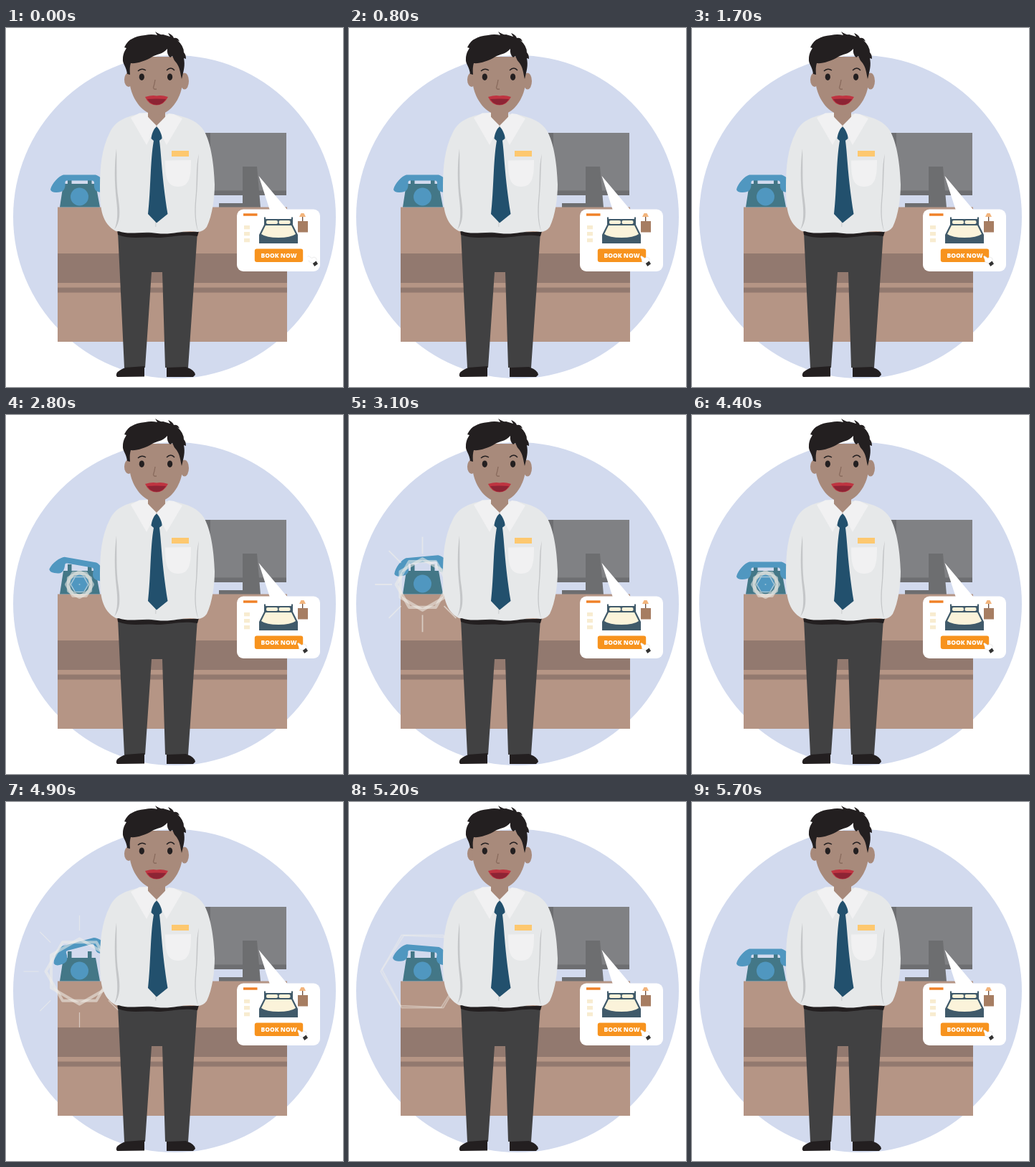
Write an HTML page with a canvas that moves like this. It is 470 px wide and 500 px high and loops after 6 s.

```html
<!DOCTYPE html>
<html lang="en">
<head>
<meta charset="utf-8">
<title>Reception desk</title>
<style>
  html, body { margin: 0; width: 100%; height: 100%; overflow: hidden; background: #fff; }
  canvas { display: block; width: 470px; height: 500px; }
</style>
</head>
<body>
<canvas id="stage" width="470" height="500"></canvas>
<script>
const ctx = document.getElementById('stage').getContext('2d');
const LOOP = 6000, STEP = 100;
const SKIN = '#a88a7b', HAIR = '#231f20', NAVY = '#22506d', BLUE = '#5097c0';
const TEAL = '#437787', WOOD = '#b59585', DARK_WOOD = '#92796f', BED = '#405a6a';
const CREAM = '#fbf3da', ORANGE = '#f7931e';

const clamp = v => Math.max(0, Math.min(1, v));
const span = (t, a, b) => clamp((t - a) / (b - a));

// Linear interpolation through [time, value] pairs.
function track(keys, t) {
  if (t <= keys[0][0]) return keys[0][1];
  for (let i = 1; i < keys.length; i++) {
    const [a, v] = keys[i - 1], [b, w] = keys[i];
    if (t <= b) return v + (w - v) * (t - a) / (b - a);
  }
  return keys[keys.length - 1][1];
}

function fill(color, d) {
  ctx.fillStyle = color;
  ctx.fill(new Path2D(d));
}
function line(color, width, d) {
  ctx.strokeStyle = color;
  ctx.lineWidth = width;
  ctx.stroke(new Path2D(d));
}
function rect(color, x, y, w, h) {
  ctx.fillStyle = color;
  ctx.fillRect(x, y, w, h);
}
function round(color, x, y, w, h, r) {
  ctx.fillStyle = color;
  ctx.beginPath();
  ctx.roundRect(x, y, w, h, r);
  ctx.fill();
}
function oval(color, x, y, rx, ry = rx) {
  ctx.fillStyle = color;
  ctx.beginPath();
  ctx.ellipse(x, y, rx, ry, 0, 0, Math.PI * 2);
  ctx.fill();
}

function drawRoom() {
  oval('#d2daee', 235, 263, 225);
  rect('#808184', 277, 146, 114, 87);
  rect('#6d6e71', 277, 146, 8, 87);
  rect('#6d6e71', 277, 226.5, 114, 6.5);
  fill('#6d6e70', 'M330 193H350L355 250H297V244H330Z');
  rect(WOOD, 72, 249.5, 320, 187.5);
  rect(DARK_WOOD, 72, 314, 320, 41);
  rect(DARK_WOOD, 72, 361.5, 320, 7);
}

// Handset swing: angle in degrees and lift in pixels.
const SWING = [[0, 0], [300, 10], [500, -15], [750, 10], [1000, -15], [1200, 10], [1300, 0]];
const LIFT = [[0, 0], [300, -3], [500, -10], [750, -3], [1000, -10], [1200, -3], [1300, 0]];

function drawPhone(t) {
  const s = t < 4100 ? t - 2500 : t - 4400;
  fill(TEAL, 'M80 217H125L131 249.5H75Z');
  rect(TEAL, 86, 208, 5.5, 10);
  rect(TEAL, 114, 208, 5.5, 10);
  oval(BLUE, 102.5, 235, 12.5);

  ctx.save();
  ctx.translate(102.5, 212 + track(LIFT, s));
  ctx.rotate(track(SWING, s) * Math.PI / 180);
  ctx.translate(-102.5, -212);
  fill(BLUE, 'M62 225C64 216 74 206 80 204.5H125C131 206 141 216 143 225Q142 229 135 229' +
    'C125 229 122 225 123 216Q123 212.5 120 212.5H85Q82 212.5 82.5 216C83 225 80 229 70 229Q63 229 62 225Z');
  ctx.restore();
}

function hexagon(r, turn) {
  ctx.beginPath();
  for (let i = 0; i < 6; i++) {
    const a = turn + i * Math.PI / 3;
    ctx.lineTo(102.5 + r * Math.cos(a), 236 + r * Math.sin(a));
  }
  ctx.closePath();
  ctx.stroke();
}

const RADIUS = [[0, 0], [300, 18], [700, 43], [800, 47], [1000, 58], [1400, 59]];
const WIDTH = [[0, 5], [300, 5], [800, 4], [1000, 2.4], [1400, 0.5]];
const TURN = [[300, Math.PI / 6], [800, Math.PI / 6], [1000, 0.06], [1400, 0]];

function drawWave(s) {
  if (s <= 0 || s >= 1400) return;
  const r = track(RADIUS, s);
  ctx.save();
  ctx.lineJoin = 'round';
  ctx.strokeStyle = '#f1eee9';
  ctx.lineWidth = track(WIDTH, s);
  ctx.globalAlpha = 0.55 * (1 - span(s, 1000, 1400));
  hexagon(r, 0);
  hexagon(r * 0.97, track(TURN, s));
  if (s < 600) {
    ctx.lineWidth = 1.5;
    hexagon(r * 0.68, 0);
    oval('#dfe9ee', 102.5, 236, 1);
  }

  if (s > 400 && s < 900) {
    const p = span(s, 400, 800);
    const inner = 28 + 29 * p, outer = 38 + 40 * Math.sqrt(p);
    ctx.globalAlpha = 0.6;
    ctx.lineWidth = 2.4 - 1.2 * p;
    ctx.beginPath();
    for (let i = 0; i < 8; i++) {
      const c = Math.cos(i * Math.PI / 4), n = Math.sin(i * Math.PI / 4);
      ctx.moveTo(102.5 + inner * c, 236 + inner * n);
      ctx.lineTo(102.5 + outer * c, 236 + outer * n);
    }
    ctx.stroke();
  }
  ctx.restore();
}

function drawBody() {
  fill('#414142', 'M156 284H267L254 473H222L218 340H203L194 473H165Z');
  fill(HAIR, 'M166 473L193 471V485.5L155 486Q151 481 160 476Z');
  fill(HAIR, 'M224 473L251 472Q264 477 264 483L261 486H224Z');
  fill(HAIR, 'M155 282C170 286 230 288 269 283L267 290C245 286 230 292 210 292C190 290 175 295 156 288Z');
  fill('#e6e8e9', 'M188 119C170 123 153 128 145 145C133 168 131 195 131 220C131 247 132 269 150 281' +
    'Q154 284 157 283C174 289 190 282 211 286C233 289 248 280 267 284Q275 284 280 277' +
    'C288 261 291 235 291 218C290 190 286 160 276 143C268 130 254 125 234 120Z');
  fill('#c4c6c8', 'M154 168C151 190 151 215 154 240C156 257 156 270 151 281C160 270 159 256 157 240C153 215 155 195 154 168Z');
  fill('#c4c6c8', 'M269 175C267 195 268 211 266 232C264 252 264 267 268 283C265 277 262 262 264 240C267 215 264 195 269 175Z');
  fill('#f1f1f2', 'M222 184.5L258 184C258 207 256 221 240 221C224 221 222 207 222 184.5Z');
  rect('#fdc86f', 231, 171, 24, 8);
  line('#c4c6c8', 0.8, 'M208.8 268V277');
}

function drawHead() {
  oval(SKIN, 171, 72, 6, 10);
  oval(SKIN, 249, 74, 6, 11.5);
  fill(SKIN, 'M198 108H222V124L210 138L198 124Z');
  fill('#f1f1f2', 'M186 118.5L198 118V124L210 136L196 163L174 125Z');
  fill('#f1f1f2', 'M222 124L227 119L234 120L246 126L224 163L210 136Z');
  fill(NAVY, 'M206 157H214C217 180 217 205 225.5 259L210 271.5L198 259C202 225 201 185 206 157Z');
  fill(NAVY, 'M210 137.5C213 139 218 149 217.5 154Q213 158 210 159Q206 158 202.5 154C203 148 206 140 210 137.5Z');

  fill(SKIN, 'M171 40H247L246 78C244 98 229 121 210 121C191 121 176 99 173 80Z');
  fill(HAIR, 'M169 64C168 54 162 49 163 43C163 36 166 31 168 28L165 27Q170 17 176 15Q182 11 194 10' +
    'Q203 8 211 10L208 5Q215 10 219 9Q226 11 229 12L226 7Q233 10 234 14Q240 13 242 19L239 17' +
    'Q248 25 248 34Q251 37 251 43L248 42C250 52 248 59 245 71C243 63 243 56 238 49' +
    'Q234 45 232 39L229 41Q224 37 225 29C218 37 211 36 204 40C195 46 181 50 174 49Q172 55 173 65Z');
  oval(HAIR, 189.3, 68.2, 3.6, 4.8);
  oval(HAIR, 228.6, 68.2, 3.6, 4.8);
  line(HAIR, 1.5, 'M184 60Q189 55 195 59');
  line(HAIR, 1.5, 'M224 59Q230 53 235 59');
  line('#8a6c5e', 1.4, 'M208 72Q207 79 205.5 83Q206 86 210 85');
  fill('#bf3441', 'M194 96Q204 93 210 94.5Q217 93 226 96Q220 107.5 210 107.5Q199 107.5 194 96Z');
  fill('#8d2434', 'M197 99Q210 98 223 99Q218 107 210 107Q202 107 197 99Z');
}

function drawBubble(press) {
  round('#fff', 322, 252.5, 116, 86.5, 9);
  fill('#fff', 'M352.5 206L393 254H368Z');
  rect('#f08026', 331, 258.3, 19.5, 3.4);
  for (let i = 0; i < 3; i++) rect('#f8ecd0', 332, 275 + 9 * i, 8, 5.3);

  rect(BED, 360, 263.5, 2, 12);
  rect(BED, 398, 263.5, 2, 12);
  rect(BED, 361, 266, 38, 9);
  fill(BED, 'M360 274H400L407 288V300H353V288Z');
  round(CREAM, 363, 268, 16, 5, 2);
  round(CREAM, 380.5, 268, 16, 5, 2);
  fill(CREAM, 'M362 275H398L404 287Q397 292 380 292Q363 292 356 287Z');

  rect('#a67d62', 407, 269, 14, 15.5);
  rect('#6b4a38', 413, 262, 1.3, 7);
  fill('#f2b47c', 'M411.5 258H415.5L418 263H409Z');

  ctx.save();
  ctx.translate(380.5, 316.7);
  ctx.scale(1 - 0.05 * press, 1 - 0.05 * press);
  round(ORANGE, -33.7, -9.2, 67.4, 18.6, 3);
  ctx.font = '800 8.5px "Open Sans", sans-serif';
  ctx.textAlign = 'center';
  ctx.fillStyle = '#fff';
  ctx.fillText('BOOK NOW', 0, 2.9);
  ctx.restore();
}

function drawHand(x, y) {
  ctx.save();
  ctx.translate(x, y);
  fill('#fff', 'M-7 -5Q-6 -7 -4 -5L-1 -3Q2 -6 5 -3L7 1L2 5L-3 3Q-6 2 -5 0Z');
  line('#dedede', 0.6, 'M-7 -5Q-6 -7 -4 -5L-1 -3Q2 -6 5 -3L6 0M-5 0Q-6 2 -3 3L1 4');
  fill('#333', 'M0.3 4.5L5 1L7.5 5L2.8 8.5Z');
  ctx.restore();
}

function draw(now) {
  const t = Math.floor((now % LOOP) / STEP) * STEP;
  const press = Math.sin(Math.PI * span(t, 1200, 1700));
  ctx.clearRect(0, 0, 470, 500);
  drawRoom();
  drawPhone(t);
  drawWave(t < 4100 ? t - 2500 : t - 4100);
  drawBody();
  drawHead();
  drawBubble(press);
  drawHand(427.5 - 14 * span(t, 0, 800), 323.5 + 3 * press);
}

const start = performance.now();
function tick() {
  draw(performance.now() - start);
  requestAnimationFrame(tick);
}
tick();
</script>
</body>
</html>
```
